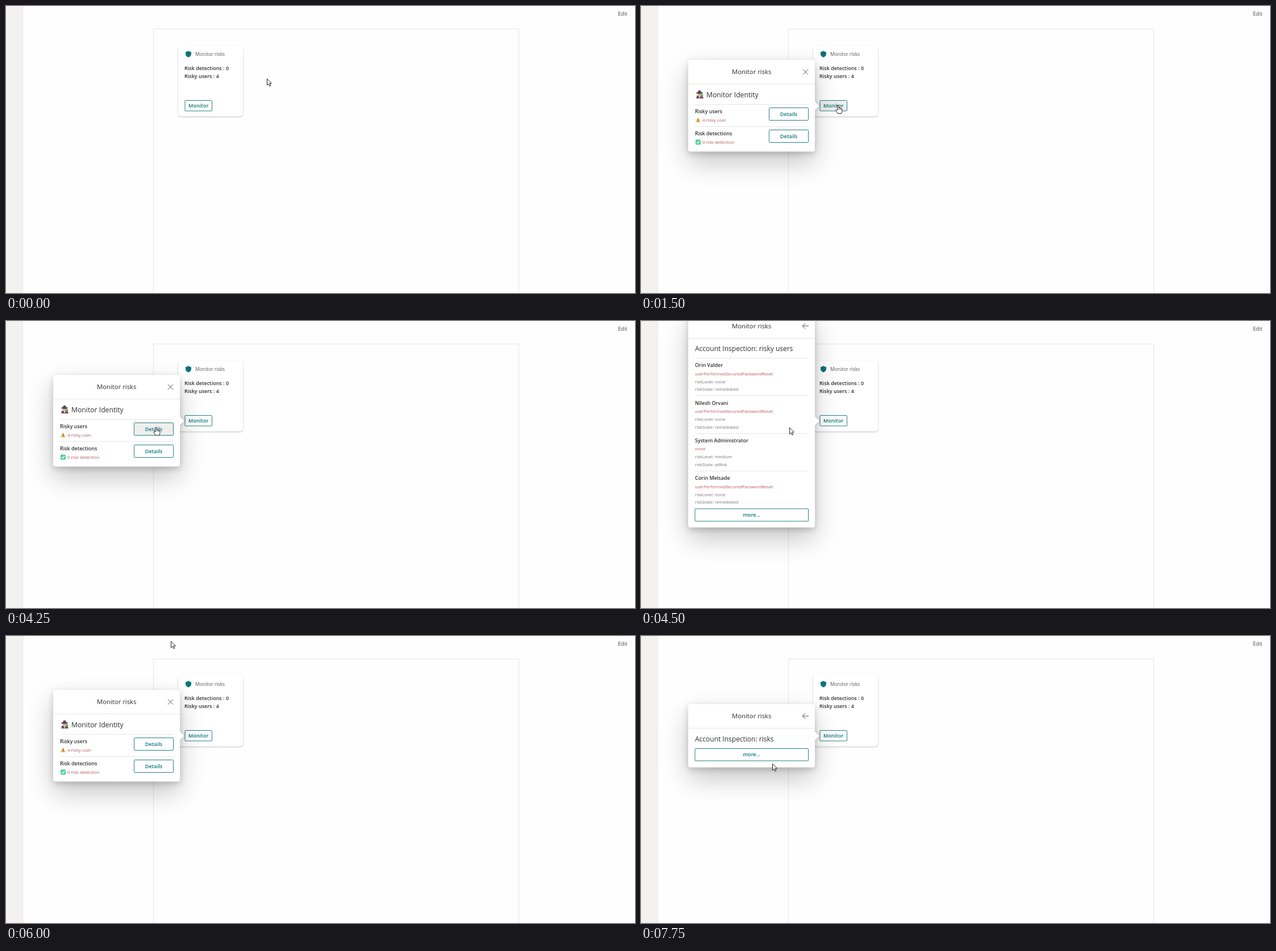
An HTML page with a canvas that plays this animation: 1107x506 px, repeating every 8000 ms.

```html
<!DOCTYPE html>
<html lang="en">
<head>
<meta charset="utf-8">
<title>Monitor risks</title>
<style>
html, body { margin: 0; width: 100%; height: 100%; overflow: hidden; background: #fff; }
canvas { display: block; }
</style>
</head>
<body>
<canvas id="stage" width="1107" height="506"></canvas>
<script>
const c = document.getElementById('stage').getContext('2d');
const LOOP = 8000, STEP = 250;
const TEAL = '#08747a', INK = '#302f2e', GREY = '#777', RED = '#b5585f', LINE = '#e6e6e6';

// Pointer stops: time, x, y
const PATH = [
  [0, 459, 128], [250, 440, 137], [500, 385, 160], [750, 346, 175], [1000, 344, 176],
  [1500, 344, 176], [1750, 300, 190], [2250, 150, 204], [2500, 113, 205],
  [2750, 112, 206], [3500, 117, 239], [3750, 117, 239], [4000, 200, 207],
  [4250, 261, 188], [5000, 261, 187], [5250, 283, 70], [5500, 290, 8],
  [6000, 290, 9], [6250, 284, 50], [6750, 243, 190], [7000, 231, 225], [8000, 231, 225]
];
// View changes: time, view
const VIEWS = [[0, null], [1250, 'main'], [4500, 'users'], [6000, 'main'], [7750, 'risks']];
const BOX = { main: [95, 161.5], users: [-12.5, 376.5], risks: [120, 111.5] };
const USERS = [
  ['Orin Valder', 'userPerformedSecuredPasswordReset', 'none', 'remediated'],
  ['Nilesh Orvani', 'userPerformedSecuredPasswordReset', 'none', 'remediated'],
  ['System Administrator', 'none', 'medium', 'atRisk'],
  ['Corin Melsade', 'userPerformedSecuredPasswordReset', 'none', 'remediated']
];

let mouse, overButton;

function pointerAt(t) {
  const i = PATH.findIndex(p => p[0] > t);
  const [t0, x0, y0] = PATH[i - 1], [t1, x1, y1] = PATH[i];
  const k = (t - t0) / (t1 - t0);
  return { x: x0 + (x1 - x0) * k, y: y0 + (y1 - y0) * k };
}

function text(s, x, y, size, color = INK, weight = 400, align = 'left') {
  c.font = `${weight} ${size}px "Open Sans", "Noto Sans", sans-serif`;
  c.fillStyle = color;
  c.textAlign = align;
  c.fillText(s, x, y);
}

function rect(x, y, w, h, color) {
  c.fillStyle = color;
  c.fillRect(x, y, w, h);
}

function shape(points, fill, stroke, width = 1) {
  c.beginPath();
  points.forEach(([x, y]) => c.lineTo(x, y));
  if (fill) { c.closePath(); c.fillStyle = fill; c.fill(); }
  if (stroke) { c.strokeStyle = stroke; c.lineWidth = width; c.stroke(); }
}

function oval(x, y, rx, ry, color) {
  c.beginPath();
  c.ellipse(x, y, rx, ry, 0, 0, 7);
  c.fillStyle = color;
  c.fill();
}

function panel(x, y, w, h, r, shadows) {
  c.fillStyle = '#fff';
  for (const [dy, blur, alpha] of shadows) {
    c.save();
    c.shadowColor = `rgba(0,0,0,${alpha})`;
    c.shadowBlur = blur;
    c.shadowOffsetY = dy;
    c.beginPath();
    c.roundRect(x, y, w, h, r);
    c.fill();
    c.restore();
  }
}

function hit(x, y, w, h) {
  const inside = mouse.x >= x && mouse.x <= x + w && mouse.y >= y && mouse.y <= y + h;
  if (inside) overButton = true;
  return inside;
}

function button(label, x, y, w, h) {
  c.beginPath();
  c.roundRect(x + .5, y + .5, w - 1, h - 1, 1);
  c.fillStyle = hit(x, y, w, h) ? '#efeeed' : '#fff';
  c.fill();
  c.strokeStyle = '#287f82';
  c.lineWidth = 1;
  c.stroke();
  text(label, x + w / 2, y + h / 2 + 3.2, 9.1, TEAL, 600, 'center');
}

function page() {
  rect(0, 0, 1107, 506, '#fefefe');
  rect(0, 0, 29, 506, '#f3f2f0');
  rect(29, 0, 1, 506, '#e9e8e6');
  text('Edit', 1077, 17, 9.2, '#444');
  c.strokeStyle = LINE;
  c.lineWidth = 1;
  c.strokeRect(259.5, 40.5, 643, 480);

  panel(303, 70, 114, 124.5, 5, [[1.2, 3, .22], [.3, 1, .08]]);
  c.beginPath();
  c.moveTo(321, 79);
  c.quadraticCurveTo(323, 81, 326, 81);
  c.lineTo(326, 84.5);
  c.quadraticCurveTo(326, 88.5, 321, 90.5);
  c.quadraticCurveTo(316, 88.5, 316, 84.5);
  c.lineTo(316, 81);
  c.quadraticCurveTo(319, 81, 321, 79);
  c.fillStyle = TEAL;
  c.fill();
  text('Monitor risks', 333, 87.7, 8.5, '#555');
  text('Risk detections : 0', 314, 113.2, 9, INK, 600);
  text('Risky users : 4', 314, 126.5, 9, INK, 600);
  button('Monitor', 314.5, 166, 48.5, 19.5);
}

function detective(x, y) {
  shape([[x, y + 14], [x + 1.5, y + 9], [x + 11, y + 9], [x + 13, y + 14]], '#655064');
  oval(x + 6, y + 6.5, 3.3, 3.7, '#edba66');
  oval(x + 6, y + 4.3, 6, 1.6, '#4b3f55');
  shape([[x + 2.7, y + 4], [x + 4, y], [x + 8, y], [x + 9.3, y + 4]], '#584765');
  shape([[x + 4.5, y + 10], [x + 7.5, y + 10], [x + 6, y + 14]], '#e5dfe5');
  oval(x + 10.2, y + 8.2, 2.2, 2.2, '#65a99b');
  shape([[x + 9.5, y + 10], [x + 7.5, y + 13.5]], null, '#9a5861', 1.4);
}

function mainView() {
  detective(97, 149);
  text('Monitor Identity', 115, 160.7, 12.2, INK, 500);
  rect(95, 173, 200, 1, LINE);
  text('Risky users', 95, 189.2, 8.95, INK, 600);
  shape([[100.5, 196.5], [105, 205], [96, 205]], '#f2b85a');
  rect(100, 199.2, 1, 3, '#51422d');
  rect(100, 203, 1, 1, '#51422d');
  text('4 risky user', 108, 204, 7.95, RED);
  button('Details', 225, 179, 70, 23);
  rect(95, 212, 200, 1, LINE);
  text('Risk detections', 95, 228.2, 8.95, INK, 600);
  c.beginPath();
  c.roundRect(96, 235.5, 9, 9, 1.5);
  c.fillStyle = '#4fd093';
  c.fill();
  shape([[98, 240], [99.8, 242], [103, 238]], null, '#fff', 1.3);
  text('0 risk detection', 108, 243, 7.95, RED);
  button('Details', 225, 218, 70, 23);
}

function usersView() {
  text('Account Inspection: risky users', 95, 52.7, 12, INK, 500);
  USERS.forEach(([name, reason, level, state], i) => {
    const y = 65 + i * 66.3;
    rect(95, Math.round(y), 200, 1, LINE);
    text(name, 95, y + 16.2, 8.95, INK, 600);
    text(reason, 95, y + 30.6, 7.65, RED);
    text('riskLevel: ' + level, 95, y + 44.6, 7.7, GREY);
    text('riskState: ' + state, 95, y + 58.4, 7.7, GREY);
  });
  button('more...', 94.5, 330.5, 200.5, 23);
}

function risksView() {
  text('Account Inspection: risks', 95, 185.5, 12, INK, 500);
  button('more...', 94.5, 198, 200.5, 22.5);
}

const DRAW = { main: mainView, users: usersView, risks: risksView };

function popup(view) {
  const [top, h] = BOX[view];
  const y = top + 21.2;
  panel(83, top, 223, h, 4, [[20, 45, .22], [3.7, 11, .18]]);
  c.save();
  c.shadowColor = 'rgba(0,0,0,.18)';
  c.shadowBlur = 5;
  c.shadowOffsetX = 1;
  shape([[305, 167], [313.5, 176], [305, 185]], '#fff');
  c.restore();
  rect(295, 163, 11, 26, '#fff');
  rect(83, Math.round(top + 42), 223, 1, LINE);
  text('Monitor risks', 194.7, y + 4.2, 11.3, INK, 500, 'center');

  const over = hit(278, y - 11, 23, 22);
  if (over) rect(278, y - 11, 23, 22, '#f0eeec');
  const color = over ? TEAL : '#555';
  if (view === 'main') {
    shape([[285, y - 4.5], [294, y + 4.5]], null, color);
    shape([[294, y - 4.5], [285, y + 4.5]], null, color);
  } else {
    shape([[295, y], [284, y]], null, color);
    shape([[289, y - 4.8], [284, y], [289, y + 4.8]], null, color);
  }
  DRAW[view]();
}

function arrow({ x, y }) {
  const pts = [[0, 0], [0, 11.3], [2.6, 9], [4.4, 13], [6.2, 12.2], [4.5, 8.3], [7.8, 8]];
  const moved = pts.map(([a, b]) => [x + .5 + a, y + .3 + b]);
  shape(moved, '#fff');
  shape([...moved, moved[0]], null, '#222');
}

function hand({ x, y }) {
  c.save();
  c.translate(x + 3, y - 1);
  c.beginPath();
  c.moveTo(-1.2, 8.8);
  c.lineTo(-1.2, 1);
  c.quadraticCurveTo(0, -1, 1.2, 1);
  c.lineTo(1.2, 5);
  c.quadraticCurveTo(2.6, 4, 3.4, 5.5);
  c.quadraticCurveTo(4.8, 4.7, 5.4, 6.2);
  c.quadraticCurveTo(7, 5.8, 7, 7.5);
  c.lineTo(7, 10.5);
  c.lineTo(5.5, 14.5);
  c.lineTo(-.5, 14.5);
  c.lineTo(-4, 9.5);
  c.quadraticCurveTo(-4, 6.6, -1.2, 8.8);
  c.closePath();
  c.fillStyle = '#fff';
  c.fill();
  c.strokeStyle = '#222';
  c.lineWidth = 1;
  c.stroke();
  for (const k of [1.2, 3.4, 5.4]) shape([[k, 5.5], [k, 8]], null, '#222', .7);
  c.restore();
}

function frame(now) {
  const t = Math.floor(now % LOOP / STEP) * STEP;
  const view = VIEWS.filter(v => v[0] <= t).pop()[1];
  mouse = pointerAt(t);
  overButton = false;
  page();
  if (view) {
    c.globalAlpha = t === 1250 ? .8 : 1;
    popup(view);
    c.globalAlpha = 1;
  }
  (overButton ? hand : arrow)(mouse);
  requestAnimationFrame(frame);
}

const start = performance.now();
requestAnimationFrame(() => frame(0));
frame = (draw => () => draw(Math.max(0, performance.now() - start)))(frame);
</script>
</body>
</html>
```
